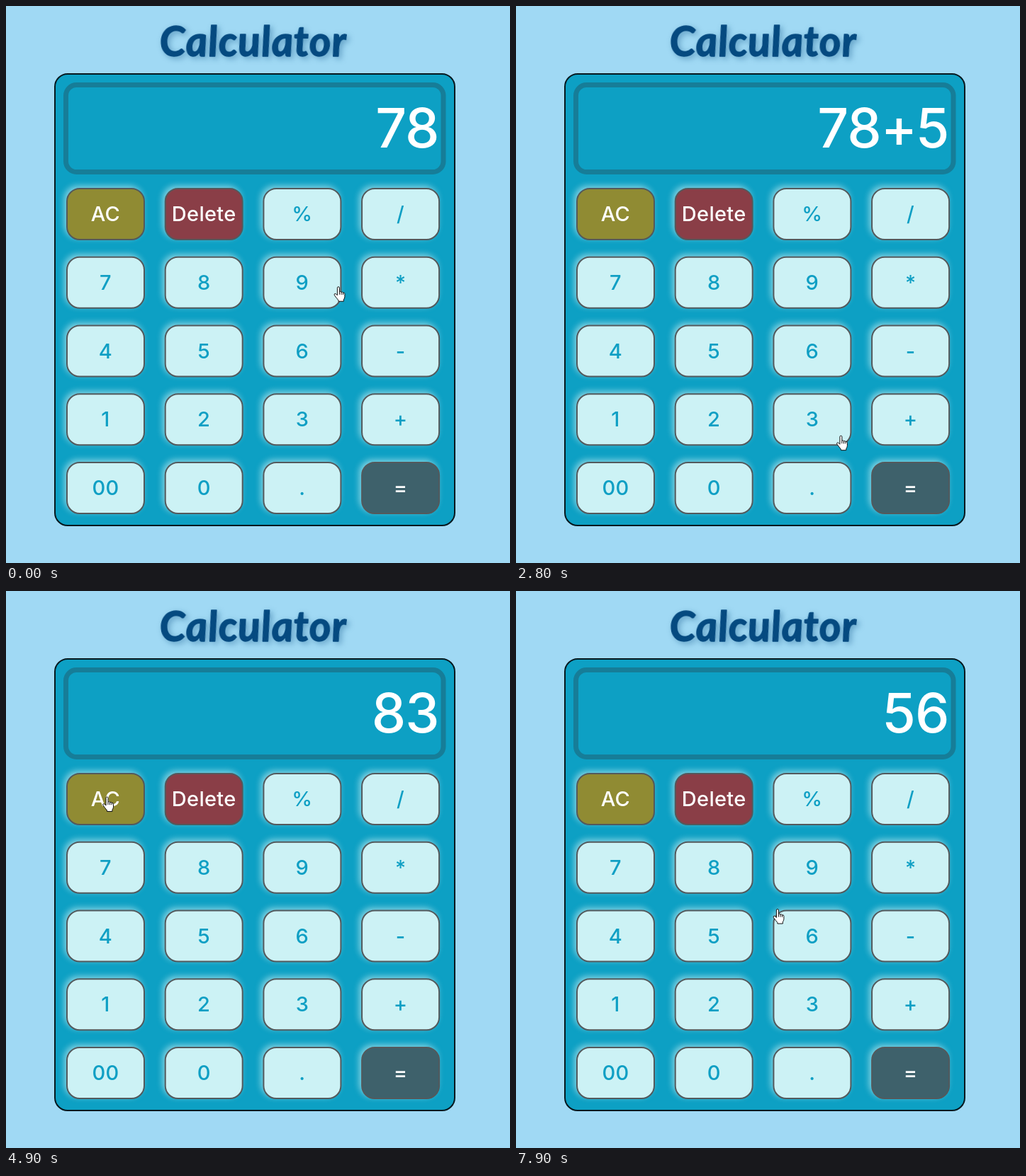
These frames come from a looping animation (711x787 px, 8 s). An HTML page:

```html
<!DOCTYPE html>
<html lang="en">
<head>
<meta charset="utf-8">
<title>Calculator</title>
<style>
html, body { margin: 0; width: 100%; height: 100%; overflow: hidden; background: #a0d9f4; }
svg { display: block; }
text { font-family: Inter, "Open Sans", sans-serif; font-weight: 500; text-anchor: middle; }
.title {
  font: italic 700 59px Lato, "Open Sans", sans-serif; letter-spacing: .7px;
  fill: #054a80; stroke: #054a80; stroke-width: 1.4; stroke-linejoin: round;
  filter: drop-shadow(3px 3px 4px rgba(5, 74, 128, .4));
}
.key { stroke: #53595c; stroke-width: 2; filter: drop-shadow(-3px -3px 4px rgba(204, 242, 245, .6)); }
.label { font-size: 29px; letter-spacing: .3px; }
#value { font-size: 77px; letter-spacing: -1px; text-anchor: end; fill: #fff; }
</style>
</head>
<body>
<svg width="711" height="787" viewBox="0 0 711 787">
  <rect width="711" height="787" fill="#a0d9f4"/>
  <text class="title" transform="translate(350 71) skewX(4)">Calculator</text>
  <rect x="69" y="96" width="564" height="638" rx="18" fill="#0da0c4" stroke="#06181e" stroke-width="2"/>
  <rect x="84.5" y="111.5" width="532.5" height="123" rx="15" fill="none" stroke="#167d98" stroke-width="7"/>
  <text id="value" x="610.5" y="200"></text>
  <g id="keys"></g>
  <g id="hand" fill="#fff" stroke="#111" stroke-linejoin="round">
    <path d="M-1.5 12V1.5a1.5 1.5 0 0 1 3 0V7q1.4-1 2.6.6 1.5-.8 2.5.6 2.4-.5 2.4 2v4q-.2 2-1.6 4v2.3H0V19Q-2.5 16-5.5 12q-1-2 .8-2.4Q-3 10-1.5 12Z"/>
    <path d="M1.5 7v4M4.1 7.6v3.6M6.6 8.2v3" fill="none"/>
  </g>
  <path id="beam" d="M-4-7.5h3l1 1 1-1h3M0-6.5v13M-4 7.5h3l1-1 1 1h3" fill="none" stroke="#64929f"/>
</svg>
<script>
const LOOP = 8000, STEP = 100, DWELL = 200;
const KEY_W = 109, KEY_H = 72;
const $ = id => document.getElementById(id);

const labels = "AC Delete % / 7 8 9 * 4 5 6 - 1 2 3 + 00 0 . =".split(" ");
const fills = { AC: "#908b33", Delete: "#8a3e47", "=": "#3e616b" };

// Keys are placed by their centres
const keys = labels.map((label, i) => ({
  label,
  x: 140.5 + (i % 4) * 138.7,
  y: 294 + Math.floor(i / 4) * 96.75
}));

$("keys").innerHTML = keys.map(({ label, x, y }) => `
  <rect class="key" x="${x - KEY_W / 2}" y="${y - KEY_H / 2}" width="${KEY_W}" height="${KEY_H}" rx="18"
    fill="${fills[label] || "#ccf2f5"}"/>
  <text class="label" x="${x}" y="${y + 10}" fill="${fills[label] ? "#fff" : "#0f9fc4"}">${label}</text>`).join("");

// A pointer stop beside a key's centre
function pass(time, label, dx, dy) {
  const key = keys.find(k => k.label === label);
  return { time, label, x: key.x + dx, y: key.y + dy, dwell: 0 };
}
const press = (...stop) => ({ ...pass(...stop), dwell: DWELL });

const route = [
  pass(0, "9", 51, 6),
  press(900, "+", -11, -10),
  press(1700, "5", -9, -18),
  press(3600, "=", 4, 1),
  pass(4300, "8", 61, -10),
  press(5000, "AC", 2, -3),
  press(5900, "5", -8, 19),
  press(7000, "6", -6, -11),
  pass(7900, "6", -49, -38)
];

function pointerAt(t) {
  const next = route.findIndex(s => s.time > t);
  if (next < 0) return route.at(-1);
  const a = route[next - 1], b = route[next];
  const start = a.time + a.dwell, end = b.time - b.dwell;
  const p = Math.min(1, Math.max(0, (t - start) / (end - start)));
  const ease = p * p * (3 - 2 * p);
  return { x: a.x + (b.x - a.x) * ease, y: a.y + (b.y - a.y) * ease };
}

function enter(value, key) {
  if (key === "AC") return "0";
  if (key === "=") return String(value.split("+").reduce((sum, n) => sum + Number(n), 0));
  return value === "0" ? key : value + key;
}

const valueAt = t => route
  .filter(s => s.dwell && s.time <= t)
  .reduce((value, s) => enter(value, s.label), "78");

const overKey = ({ x, y }) => keys.some(k =>
  Math.abs(x - k.x) < KEY_W / 2 + 3 && Math.abs(y - k.y) < KEY_H / 2 + 3);

function place(id, { x, y }, shown) {
  $(id).setAttribute("transform", `translate(${x} ${y})`);
  $(id).setAttribute("visibility", shown ? "visible" : "hidden");
}

function draw() {
  const t = Math.floor(performance.now() % LOOP / STEP) * STEP;
  const pointer = pointerAt(t), over = overKey(pointer);
  place("hand", pointer, over);
  place("beam", pointer, !over);
  $("value").textContent = valueAt(t);
  requestAnimationFrame(draw);
}
draw();
</script>
</body>
</html>
```
